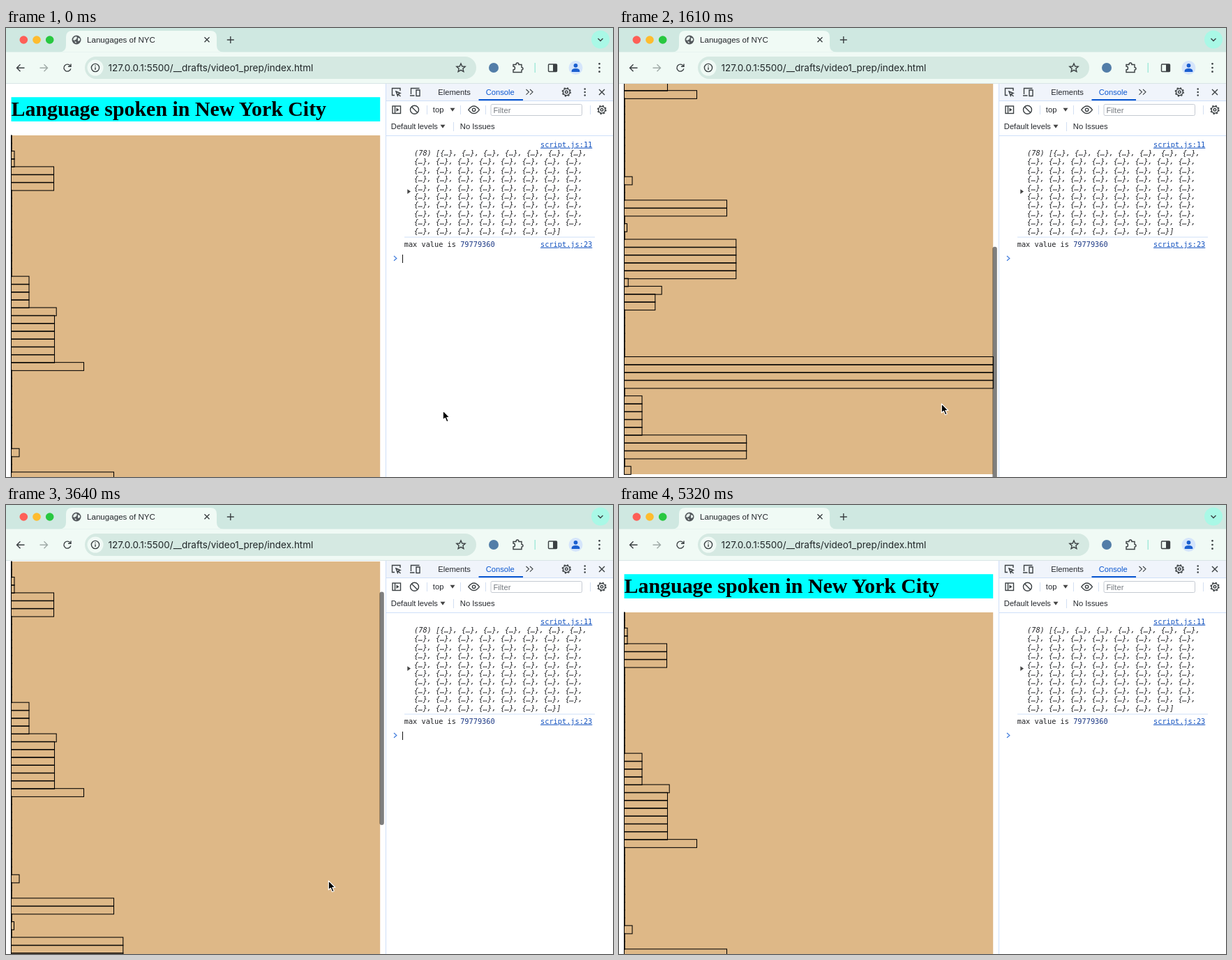
Animation of 870 by 644 pixels, one loop 5670 ms. Source, as an HTML page:

```html
<!DOCTYPE html>
<html lang="en">
<head>
<meta charset="utf-8">
<title>Languages page with console</title>
<style>
html, body { margin: 0; width: 100%; height: 100%; overflow: hidden; background: #fff; }
svg { display: block; width: 870px; height: 644px; }
text { white-space: pre; }
.ui { font: 11.2px "Liberation Sans", Arial, sans-serif; fill: #24272c; }
.tab { font-size: 11.6px; }
.url { font: 13.5px Inter, sans-serif; fill: #202628; }
.title { font: 700 29.9px "Liberation Serif", "Times New Roman", serif; }
.mono { font: 10.29px "DejaVu Sans Mono", monospace; fill: #202124; }
.list { font-style: italic; }
.link { fill: #1453c0; text-decoration: underline; }
.line { fill: none; stroke: #3b4043; stroke-width: 1.4; }
.bar { fill: none; stroke: #000; stroke-width: 1.05; }
</style>
</head>
<body>
<svg viewBox="0 0 870 644" xmlns="http://www.w3.org/2000/svg">
  <defs><clipPath id="view"><rect y="80" width="544" height="564"/></clipPath></defs>
  <rect width="870" height="644" fill="#fff"/>

  <!-- page -->
  <g clip-path="url(#view)">
    <g id="page">
      <rect x="7.5" y="99.2" width="528.7" height="34.8" fill="#0ff"/>
      <text class="title" x="7.6" y="126">Language spoken in New York City</text>
      <rect x="7.5" y="154" width="528.7" height="876" fill="#deb887"/>
      <g id="bars" class="bar"></g>
    </g>
    <rect id="thumb" x="535.4" width="6.4" height="334.5" rx="3.2" fill="#000"/>
  </g>

  <!-- tab strip -->
  <rect width="870" height="50" fill="#cfe8e1"/>
  <path d="M76 34.5Q86 34.5 86 25V13Q86 4 95 4H293Q302 4 302 13V25Q302 34.5 312 34.5Z" fill="#f0faf5"/>
  <rect y="34.5" width="870" height="45" fill="#f0faf5"/>
  <rect y="79" width="870" height="1" fill="#d9e5e6"/>
  <g id="lights"></g>
  <circle cx="101" cy="17" r="6.5" fill="#53585c"/>
  <path d="M97 14l3-2 2 1-1 3-3 2-2-1M103 14l3 1v3l-3 1zM98 19l3 1-1 2z" fill="#e5efeb"/>
  <text class="ui tab" x="116" y="20.8">Lanugages of NYC</text>
  <path class="line" d="M284.500 13.200l7 7m0-7l-7 7M316.800 17h10m-5-5v10"/>
  <circle cx="852" cy="16.500" r="13" fill="#a9f8e6"/>
  <path class="line" d="M848.500 15l3.500 3.500 3.500-3.500"/>

  <!-- toolbar -->
  <rect x="113" y="41" width="561" height="32" rx="16" fill="#d5e9e2"/>
  <path class="line" d="M26.500 57.300H15.500m5-5l-5 5 5 5"/>
  <path class="line" d="M48.500 57.300h11m-5-5l5 5-5 5" style="stroke:#9faaa7"/>
  <path class="line" d="M92.200 54.500a5 5 0 1 0 .6 3.800M93 51.500v3.800h-4"/>
  <circle cx="128" cy="57" r="11.5" fill="#f0faf5"/>
  <circle class="line" cx="128" cy="57" r="5.6"/>
  <path class="line" d="M128 56.300v3.700m0-6.300v1.400"/>
  <text class="url" x="146.5" y="61.9">127.0.0.1:5500/__drafts/video1_prep/index.html</text>
  <path class="line" d="M652 51l1.800 4 4.400.4-3.300 2.900 1 4.300-3.900-2.300-3.900 2.300 1-4.300-3.300-2.900 4.400-.4z"/>
  <circle cx="699" cy="57" r="7" fill="#527da8"/>
  <path class="line" d="M727 52.500h4q0-2.500 2-2.500t2 2.500h4v4q2 0 2 1.800t-2 1.800v3.400h-12v-3.500q2.500 0 2.500-2.500t-2.500-2.500z"/>
  <rect x="757.5" y="50" width="1.5" height="14" fill="#a5eadb"/>
  <rect class="line" x="777.5" y="52" width="12" height="10.5" rx="1"/>
  <rect x="784" y="52" width="5.5" height="10.5" fill="#3b4043"/>
  <circle cx="816.5" cy="57" r="10" fill="#d5e5fb"/>
  <path d="M810.700 63v-1.500q0-3.500 5.800-3.500t5.800 3.500V63zM813.600 53.800a2.900 2.900 0 1 1 5.800 0a2.900 2.900 0 1 1-5.800 0" fill="#1b5fd0"/>

  <!-- developer tools -->
  <rect x="544" y="80" width="326" height="564" fill="#fff"/>
  <rect x="544" y="80" width="326" height="24" fill="#f0f4fb"/>
  <path d="M544.500 80V644M544 104.500H870M544 154.500H870M571 300H844" fill="none" stroke="#cfdff8"/>
  <path class="line" d="M557 96.500h-3.500V86.500H565V90M559 91l6 2.500-2.700 1-1 2.700zm3 4l3.500 3"/>
  <path class="line" d="M580.500 95v-8.500h12M579 97h6.500M588 89h5v8.500h-5z"/>
  <text class="ui" x="619.3" y="95.5">Elements</text>
  <text class="ui" x="687.7" y="95.5" style="fill:#0b57d0">Console</text>
  <rect x="677.5" y="102" width="63.5" height="2" fill="#0b57d0"/>
  <path class="line" d="M745.500 88l4 3.800-4 3.800m5.500-7.600l4 3.800-4 3.800" style="stroke-width:1.1"/>
  <g id="icons"></g>
  <path class="line" d="M850 88l8 8m0-8l-8 8"/>

  <rect class="line" x="554" y="112" width="11.5" height="10.5"/>
  <path class="line" d="M557.500 112v10.500"/>
  <path d="M559.500 114.500l4 2.700-4 2.700z" fill="#3b4043"/>
  <circle class="line" cx="585.5" cy="117.3" r="6"/>
  <path class="line" d="M581.300 113l8.500 8.500"/>
  <path d="M603.500 111v13M651.500 111v13M687.500 111v13M837.500 111v13M641.500 135v13" stroke="#d3dff2"/>
  <text class="ui" x="611.8" y="121.2">top</text>
  <path d="M636.500 114.800h7l-3.500 5zM622.500 138.800h7l-3.500 5z" fill="#444"/>
  <path class="line" d="M662.800 117.300q7.800-10.500 15.600 0q-7.800 10.500-15.600 0z"/>
  <circle class="line" cx="670.6" cy="117.3" r="2.2"/>
  <rect x="695" y="109.5" width="130.5" height="16" rx="2" fill="#fff" stroke="#c5cad2"/>
  <text class="ui" x="698.5" y="121.5" style="fill:#757a80">Filter</text>
  <text class="ui" x="551.8" y="145">Default levels</text>
  <text class="ui" x="650.8" y="145">No Issues</text>

  <text class="mono link" x="766" y="170.7">script.js:11</text>
  <g id="list"></g>
  <path d="M575.300 231.200l4.700 3.400-4.700 3.400z" fill="#444"/>
  <text class="mono" x="570.7" y="313.7">max value is <tspan fill="#1a3784">79779360</tspan></text>
  <text class="mono link" x="766" y="313.7">script.js:23</text>
  <path d="M556 327l3.800 3.400-3.800 3.400" fill="none" stroke="#3a78dc" stroke-width="1.2"/>
  <rect id="caret" x="568" y="325" width="1" height="12" fill="#111"/>

  <path id="cursor" d="M0 0V13.200L3 10.500 5.300 16 7.800 15 5.500 9.700H9.600Z" fill="#000" stroke="#fff" stroke-width="1.1" stroke-linejoin="round"/>
</svg>
<script>
const LOOP = 5670, STEP = 70, BARS = 78, PITCH = 11.23;
const $ = id => document.getElementById(id);

function add(parent, tag, attrs, text) {
  const el = document.createElementNS("http://www.w3.org/2000/svg", tag);
  for (const k in attrs) el.setAttribute(k, attrs[k]);
  if (text) el.textContent = text;
  $(parent).appendChild(el);
}

// Visible bars as [first row, count, width]; all other rows are slivers
const SLIVER = .7;
const runs = [
  [2, 2, 4.5], [4, 3, 61], [18, 4, 25.5], [22, 1, 64.7], [23, 6, 62], [29, 1, 104],
  [40, 1, 11.5], [43, 2, 147], [46, 1, 4], [48, 5, 160.3], [53, 1, 5.7], [54, 1, 53.7],
  [55, 2, 44.3], [63, 4, 528.9], [68, 5, 25.5], [73, 3, 175.2], [77, 1, 9.6]
];
for (let row = 0; row < BARS; row++) {
  const run = runs.find(([first, count]) => row >= first && row < first + count);
  add("bars", "rect", { x: 7.5, y: 154 + row * PITCH, width: run ? run[2] : SLIVER, height: 11.7 });
}

for (let i = 0; i < 10; i++) {
  const items = Array(i % 9 ? 8 : 7).fill("{…}").join(", ");
  const text = (i ? "" : "(78) [") + items + (i < 9 ? "," : "]");
  add("list", "text", { class: "mono list", x: 585, y: 182.8 + i * 12.43 }, text);
}

["#fe5f57", "#febc2e", "#28c840"].forEach((fill, i) =>
  add("lights", "circle", { cx: 25.3 + i * 18.7, cy: 17, r: 5.8, fill }));

function dots(cx, cy, gap, r) {
  for (let i = -1; i <= 1; i++) add("icons", "circle", { cx, cy: cy + i * gap, r, fill: "#3b4043" });
}

function gear(cx, cy) {
  add("icons", "circle", { class: "line", cx, cy, r: 4.8 });
  add("icons", "circle", { class: "line", cx, cy, r: 6, "stroke-dasharray": "2.35 2.36" });
  add("icons", "circle", { class: "line", cx, cy, r: 1.8 });
}

dots(850.5, 57, 5.7, 1.35);
dots(829.7, 92, 4.5, 1.25);
gear(803.3, 91.8);
gear(854, 117.3);

// Progress 0..1 of the span from a to b, plain and smoothed
const ramp = (t, a, b) => Math.min(1, Math.max(0, (t - a) / (b - a)));
const ease = (t, a, b) => { const u = ramp(t, a, b); return u * u * (3 - 2 * u); };

// Swipe down past the end, spring back, then a fling to the top
function scrollAt(t) {
  const down = 390 * ease(t, 343, 1610) - 2 * ease(t, 1610, 1820);
  return down * (1 - ramp(t, 2940, 4620)) ** 3.1;
}

function thumbAt(t) {
  const first = ramp(t, 350, 420) - ramp(t, 1750, 2030);
  const second = ramp(t, 2940, 3010) - ramp(t, 4970, 5320);
  return .5 * (first + second);
}

function draw(time) {
  const t = Math.floor((time % LOOP) / STEP) * STEP;
  const scroll = scrollAt(t);
  $("page").setAttribute("transform", `translate(0 ${-scroll})`);
  $("thumb").setAttribute("y", 81 + scroll * .597);
  $("thumb").setAttribute("opacity", thumbAt(t));

  const arrive = ease(t, 0, 210), leave = ease(t, 4690, 5320);
  const x = 626.3 - 164 * arrive + 98 * leave;
  const y = 548.8 - 10 * arrive + 126 * leave;
  $("cursor").setAttribute("transform", `translate(${x} ${y})`);

  const blink = Math.floor((t - 190) / 600);
  $("caret").setAttribute("opacity", t < 5590 && blink % 2 ? 1 : 0);
}

const start = performance.now();
function tick() {
  draw(performance.now() - start);
  requestAnimationFrame(tick);
}
draw(0);
requestAnimationFrame(tick);
</script>
</body>
</html>
```
